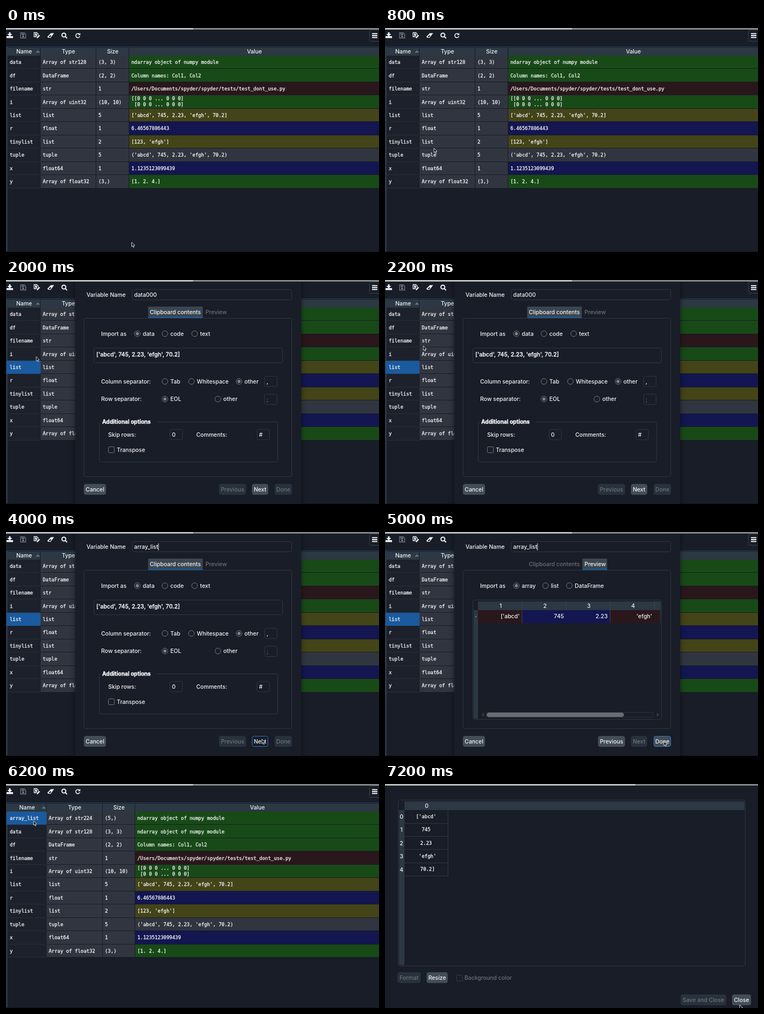
An HTML page with a canvas that plays this animation: 690 by 413 pixels, repeating every 7.4 s.

```html
<!DOCTYPE html>
<html lang="en">
<head>
<meta charset="utf-8">
<title>Variable import</title>
<style>
html, body { margin: 0; width: 100%; height: 100%; overflow: hidden; background: #191d27; }
canvas { display: block; }
</style>
</head>
<body>
<canvas id="stage" width="690" height="413"></canvas>
<script>
const g = document.getElementById('stage').getContext('2d');
const LOOP = 7400, STEP = 200;
const BG = '#191d27', HEAD = '#2c3843', LINE = '#2d3640', CELL = '#31353f', WHITE = '#f2f3f4',
  DIM = '#6b7178', SELECT = '#1a5a9e', HOVER = '#2377bd', RING = '#71777f',
  GREEN = '#184a18', RED = '#29171c', OLIVE = '#434418', BLUE = '#131650';
const UI = '500 10.4px Inter, sans-serif', BOLD = '700 10.1px Inter, sans-serif',
  MONO = '8.94px "DejaVu Sans Mono", monospace';

const vars = [
  ['data', 'Array of str128', '(3, 3)', 'ndarray object of numpy module', GREEN],
  ['df', 'DataFrame', '(2, 2)', 'Column names: Col1, Col2', GREEN],
  ['filename', 'str', '1', '/Users/Documents/spyder/spyder/tests/test_dont_use.py', RED],
  ['i', 'Array of uint32', '(10, 10)', '', GREEN],
  ['list', 'list', '5', "['abcd', 745, 2.23, 'efgh', 70.2]", OLIVE],
  ['r', 'float', '1', '6.46567886443', BLUE],
  ['tinylist', 'list', '2', "[123, 'efgh']", OLIVE],
  ['tuple', 'tuple', '5', "('abcd', 745, 2.23, 'efgh', 70.2)", CELL],
  ['x', 'float64', '1', '1.1235123099439', BLUE],
  ['y', 'Array of float32', '(3,)', '[1. 2. 4.]', GREEN]
];
const added = ['array_list', 'Array of str224', '(5,)', 'ndarray object of numpy module', GREEN];

// Pointer stops: time, x, y
const path = [
  [0, 232, 394.5], [1200, 40.5, 160.5], [1800, 40.5, 160.5], [2200, 70.3, 121], [2400, 190, 84],
  [2600, 292, 24], [3600, 292, 24], [4000, 473, 381.5], [4400, 473, 381.5], [4800, 515.5, 385.5],
  [5200, 515.5, 385.5], [5800, 50.5, 67.5], [6800, 50.5, 67.5], [7000, 400, 345], [7200, 655.5, 406.5]
];

function rect(x, y, w, h, color) {
  g.fillStyle = color;
  g.fillRect(x, y, w, h);
}

function box(x, y, w, h, stroke = LINE, fill, r = 3) {
  g.beginPath();
  g.roundRect(x + .5, y + .5, w - 1, h - 1, r);
  if (fill) { g.fillStyle = fill; g.fill(); }
  g.strokeStyle = stroke;
  g.lineWidth = 1;
  g.stroke();
}

function text(s, x, cy, color = WHITE, font = UI, align = 'left') {
  const y = cy + (font === MONO ? 3.2 : 3.5);
  g.font = font;
  g.textAlign = align;
  g.fillStyle = g.strokeStyle = color;
  g.fillText(s, x, y);
  if (font !== UI) {
    g.lineWidth = font === BOLD ? .4 : .3;
    g.strokeText(s, x, y);
  }
}

function poly(points, fill, stroke, width = 1) {
  g.beginPath();
  for (let i = 0; i < points.length; i += 2) g.lineTo(points[i], points[i + 1]);
  g.closePath();
  if (fill) { g.fillStyle = fill; g.fill(); }
  if (stroke) { g.strokeStyle = stroke; g.lineWidth = width; g.stroke(); }
}

function arc(x, y, r, from, to, color, width) {
  g.beginPath();
  g.arc(x, y, r, from, to);
  g.strokeStyle = color;
  g.lineWidth = width;
  g.stroke();
}

function button(label, x, y, w, on = true, border, fill) {
  const base = on ? '#434d57' : '#28323c';
  box(x, y, w, 20, border || base, fill || base);
  text(label, x + w / 2, y + 10, on ? WHITE : DIM, UI, 'center');
}

function radio(label, x, y, on) {
  arc(x, y, 5.3, 0, 7, RING, 1);
  if (on) {
    g.beginPath();
    g.arc(x, y, 2.9, 0, 7);
    g.fillStyle = '#7d838a';
    g.fill();
  }
  text(label, x + 10, y);
}

function input(s, x, y, w, on = true) {
  box(x, y, w, 20);
  text(s, x + 4, y + 10, on ? WHITE : DIM);
}

function strip(split) {
  rect(0, 0, 690, 3, '#7f8584');
  rect(0, 0, split, 3, '#b3bab8');
}

function floppy(x, y, s, color) {
  const r = x + s, b = y + s;
  poly([x, y, r - 2.5, y, r, y + 2.5, r, b, x, b], null, color, 1.3);
  rect(x + 2, y + 1.5, s - 5, 2.5, color);
  rect(x + s / 2 - 1.7, b - 4.5, 3.4, 3, color);
}

function toolbar() {
  rect(5.5, 8, 3, 4, WHITE);
  poly([2.5, 11, 11.5, 11, 7, 15.5], WHITE);
  rect(1, 15, 12, 3.5, WHITE);
  floppy(27, 9, 9.5, '#747a82');
  floppy(52, 8.5, 7.5, WHITE);
  poly([56.5, 17, 61, 12, 63.5, 14, 59, 19, 56.5, 19.5], WHITE, BG);
  poly([76.5, 16, 83, 9.5, 89, 9.5, 82.5, 18, 78, 18], WHITE);
  poly([79, 16, 81.5, 13.5, 84, 14, 82, 16.8, 79, 16.8], BG);
  arc(107, 13, 3.6, 0, 7, WHITE, 2);
  g.beginPath();
  g.moveTo(109.6, 15.6);
  g.lineTo(113, 19);
  g.stroke();
  arc(133, 14, 3.8, .3, 5.4, WHITE, 1.6);
  poly([137.5, 9, 137.5, 13.3, 133.2, 13.3], WHITE);
  box(672, 3, 22, 22, '#3a434d');
  for (let i = 0; i < 3; i++) rect(677, 9.5 + 3.5 * i, 10, 2, WHITE);
}

function explorer(rows, edges, heads, selected) {
  toolbar();
  rect(0, 34, 690, 1, '#1b3f62');
  rect(0, 35, 3, 377, HEAD);
  rect(0, 36, 690, 15, HEAD);
  ['Name', 'Type', 'Size', 'Value'].forEach((s, i) => {
    if (i) rect(edges[i] - 1, 36, 1, 15, BG);
    text(s, heads[i], 43.5, WHITE, UI, 'center');
  });
  const tip = edges[1] - 5;
  poly([tip - 4, 45.5, tip + 4, 45.5, tip, 41], '#66727c');
  rows.forEach((row, i) => {
    const y = Math.round(51 + 24.45 * i), h = Math.round(51 + 24.45 * (i + 1)) - y - 1;
    const cy = 63 + 24.45 * i;
    rect(3, y + h, edges[1] - 3, 1, '#282d36');
    ['#1d212b', CELL, CELL, row[4]].forEach((fill, c) => {
      const end = c < 3 ? edges[c + 1] - 1 : 690;
      rect(edges[c], y, end - edges[c], h, fill);
      if (!c && row[0] === selected) rect(1, y, end, h + 1, SELECT);
      text(row[c], edges[c] + 4, cy, WHITE, MONO);
    });
    if (row[0] === 'i') {
      g.save();
      g.beginPath();
      g.rect(edges[3], y, 690, h);
      g.clip();
      for (let k = 0; k < 3; k++)
        text((k ? ' ' : '[') + '[0 0 0 ... 0 0 0]', edges[3] + 4, cy - 6.3 + 10.8 * k, WHITE, MONO);
      g.restore();
    }
  });
  rect(0, 412, 690, 1, '#11151c');
}

function clipboardPage() {
  radio('data', 243, 99, true);
  radio('code', 294, 99);
  radio('text', 349, 99);
  box(162, 125, 350, 28);
  text("['abcd', 745, 2.23, 'efgh', 70.2]", 167, 137, WHITE, UI.replace('10.4', '10.6'));
  text('Column separator:', 176, 187);
  radio('Tab', 294, 187);
  radio('Whitespace', 343, 187);
  radio('other', 431, 187, true);
  input(',', 478, 177, 24);
  text('Row separator:', 176, 219.5);
  radio('EOL', 294, 219.5, true);
  radio('other', 392, 219.5);
  input(';', 478, 210, 24, false);
  box(172, 261, 331, 75);
  rect(176, 257, 103, 9, BG);
  text('Additional options', 178, 261.5, WHITE, BOLD);
  text('Skip rows:', 189, 285);
  input('0', 303, 275, 24);
  text('Comments:', 352, 285);
  input('#', 464, 275, 24);
  box(189, 307, 12, 12, RING, null, 2);
  text('Transpose', 205, 313);
}

function previewPage() {
  radio('array', 243, 99, true);
  radio('list', 297, 99);
  radio('DataFrame', 341, 99);
  box(162, 125, 350, 221);
  rect(164, 144, 8, 200, HEAD);
  rect(172, 128, 338, 16, HEAD);
  text('·', 168, 156, WHITE, UI, 'center');
  ["['abcd'", '745', '2.23', "'efgh'", ''].forEach((s, i) => {
    const x = Math.round(172 + 81.6 * i), w = i < 4 ? 81 : 11;
    rect(x, 144, w, 24, s > '0' && s < ':' ? BLUE : RED);
    rect(x + w, 128, 1, 40, i < 4 ? '#3b444d' : HEAD);
    if (s) {
      text(i + 1, x + 42, 136, WHITE, UI, 'center');
      text(s, x + 77, 155.5, WHITE, UI, 'right');
    }
  });
  box(187, 332, 310, 10);
  box(188, 333, 254, 8, '#696c70', '#696c70', 3.5);
  poly([183, 333.5, 183, 340.5, 179, 337], '#38424c');
  poly([503, 333.5, 503, 340.5, 507, 337], '#38424c');
}

function dialog(t) {
  const preview = t >= 4400;
  g.save();
  g.shadowColor = 'rgba(0, 0, 0, .5)';
  g.shadowBlur = 9;
  rect(128, 0, 418, 420, BG);
  g.restore();

  const typed = 'array_list'.slice(0, Math.max(0, Math.ceil((t - 2800) / 80)));
  text('Variable Name', 149, 27);
  box(233, 17, 296, 20, t >= 2600 && t < 3800 ? HOVER : LINE);
  if (t === 2800) rect(237, 20, 42, 14, SELECT);
  text(typed || 'data000', 237, 27);
  if (typed) rect(237 + g.measureText(typed).width, 21, 1, 13, WHITE);

  box(144, 70, 385, 293);
  const [tabX, tabW] = preview ? [365, 46] : [263, 101];
  rect(tabX, 49, tabW, 19, '#3b4650');
  rect(tabX, 68, tabW, 2, SELECT);
  text('Clipboard contents', 266, 59.5, preview ? DIM : WHITE);
  text('Preview', 369, 59.5, preview ? WHITE : DIM);
  text('Import as', 176, 99);
  preview ? previewPage() : clipboardPage();

  const onNext = !preview && t >= 4000;
  button('Cancel', 144, 376, 41);
  button('Previous', 394, 376, 50, preview);
  button('Next', 455, 376, 30, !preview, onNext && HOVER, onNext && BG);
  button('Done', 497, 376, 32, preview, t >= 4800 && HOVER);
}

function editor(hover) {
  box(24, 29, 643, 307, hover ? HOVER : LINE);
  rect(36, 32, 629, 16, HEAD);
  rect(26, 48, 10, 286, HEAD);
  text('0', 77, 40, WHITE, UI, 'center');
  ["['abcd'", '745', '2.23', " 'efgh'", ' 70.2]'].forEach((s, i) => {
    const y = 60 + 24.4 * i;
    text(i, 30.5, y + .5, WHITE, UI, 'center');
    text(s, 76, y - .5, WHITE, MONO, 'center');
    rect(36, Math.round(y + 11.5), 81, 1, LINE);
  });
  rect(116, 48, 1, 122, LINE);
  button('Format', 23, 347, 43, false);
  button('Resize', 77, 347, 39);
  box(132, 352, 12, 12, '#363e47', null, 2);
  text('Background color', 147, 357.5, DIM);
  button('Save and Close', 547, 388, 84, false);
  button('Close', 642, 388, 35);
}

function pointer(t) {
  const next = path.findIndex(p => p[0] >= t);
  const i = next < 0 ? path.length - 1 : Math.max(1, next);
  const [t0, x0, y0] = path[i - 1], [t1, x1, y1] = path[i];
  const k = Math.min(1, (t - t0) / (t1 - t0)), e = k * k * (3 - 2 * k);
  g.save();
  g.translate(x0 + (x1 - x0) * e, y0 + (y1 - y0) * e);
  poly([.5, .5, .5, 8.5, 2.3, 6.9, 3.7, 10, 5, 9.4, 3.7, 6.4, 6.2, 6.2], '#0b0d11', '#e4e6e8', .9);
  g.restore();
}

function draw(t) {
  rect(0, 0, 690, 413, BG);
  if (t >= 6400) editor(t < 7000);
  else if (t >= 5400)
    explorer([added, ...vars], [3, 75, 179, 239], [39, 127, 209, 465], t >= 6200 && 'array_list');
  else {
    explorer(vars, [3, 64, 167, 228], [33.5, 115.5, 197.5, 459.5], t >= 1200 && 'list');
    if (t >= 2000) dialog(t);
  }
  strip(t < 6400 ? 346 : 463);
  if (t < 3000 || t > 3600) pointer(t);
}

function frame(now) {
  draw(Math.floor(now % LOOP / STEP) * STEP);
  requestAnimationFrame(frame);
}
requestAnimationFrame(frame);
</script>
</body>
</html>
```
